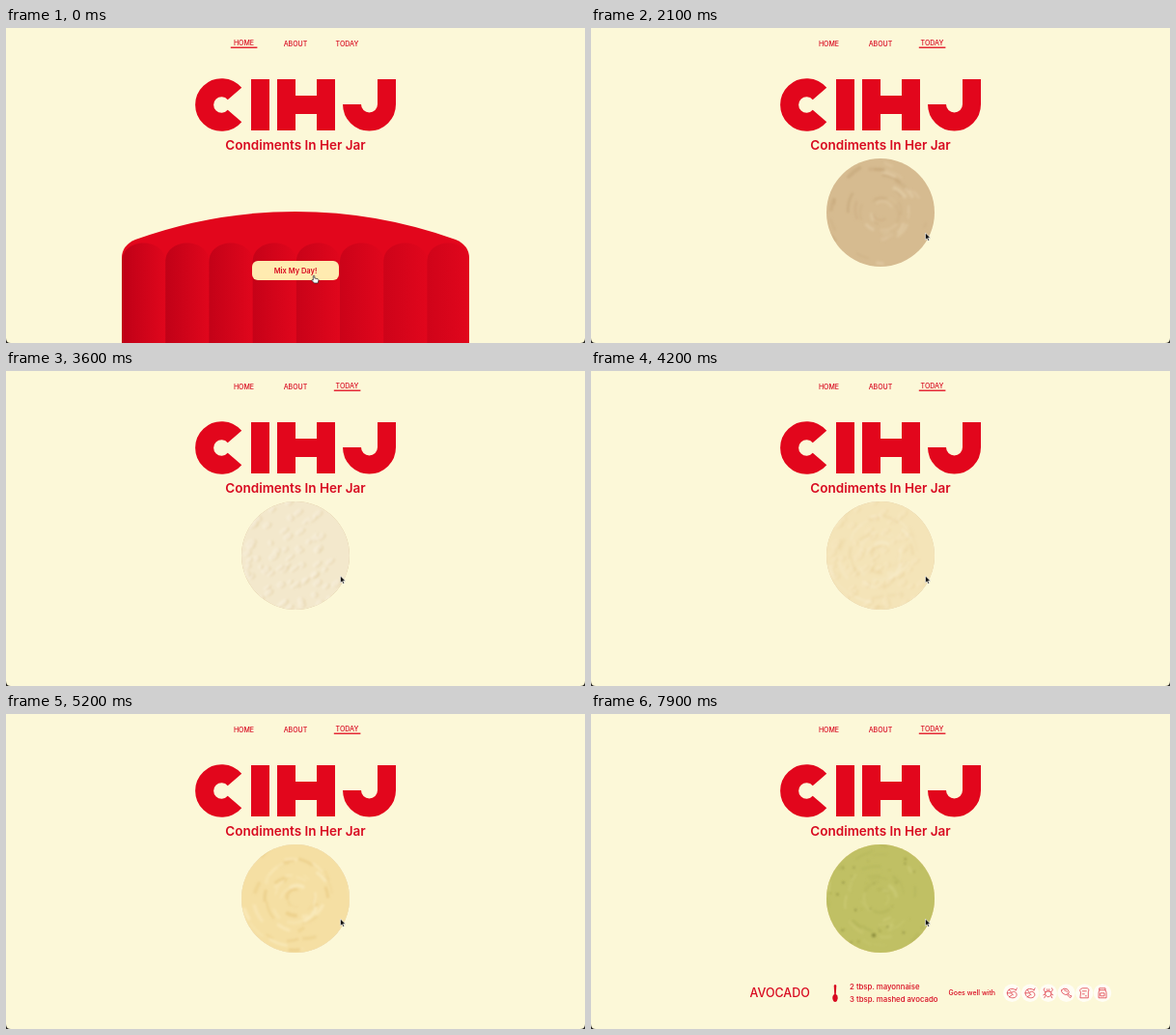
Animation, 600 px wide and 326 px high, one loop 8000 ms. Source, as an HTML page:

```html
<!DOCTYPE html>
<html lang="en">
<head>
<meta charset="utf-8">
<title>Condiments In Her Jar</title>
<style>
  html, body { margin: 0; width: 100%; height: 100%; overflow: hidden; background: #fcf8d8; }
  svg { display: block; width: 600px; height: 326px; }
  text { font-family: Inter, Lato, sans-serif; font-weight: 500; fill: #d80a20; }
  .mid { text-anchor: middle; }
  .line { fill: none; stroke: #e2061c; }
  .icon { fill: none; stroke: #dc3040; stroke-width: .75; stroke-linecap: round; stroke-linejoin: round; }
</style>
</head>
<body>
<svg viewBox="0 0 600 326">
  <defs>
    <linearGradient id="shade">
      <stop offset="0" stop-color="#b80016"/>
      <stop offset="1" stop-color="#df061c"/>
    </linearGradient>
    <clipPath id="dish"><circle cx="300" cy="191" r="56"/></clipPath>
    <filter id="soft" x="-20%" y="-20%" width="140%" height="140%"><feGaussianBlur stdDeviation=".9"/></filter>
  </defs>
  <rect width="600" height="326" fill="#fcf8d8"/>

  <g id="nav" font-size="7"></g>
  <g class="line" stroke-width="19" role="img" aria-label="CIHJ">
    <path d="M237 68A17.8 17.8 0 1 0 237 91M263.5 53V106M290.5 53V106M331.5 53V106M290 79.5H332M394.5 53V79A18 18 0 0 1 358.5 79"/>
  </g>
  <text class="mid" x="300" y="125.5" font-size="13.5" style="font-weight:600">Condiments In Her Jar</text>

  <g id="lid">
    <path fill="#e2061c" d="M120 326V238Q120 225 134 219A489 489 0 0 1 466 219Q480 225 480 238V326Z"/>
    <g id="ribs"></g>
    <rect id="button" x="255" y="241" width="90" height="20" rx="6" fill="#ffebb0"/>
    <text class="mid" x="300" y="253.7" font-size="7.5" style="font-weight:600">Mix My Day!</text>
  </g>

  <g id="sauces" clip-path="url(#dish)"></g>

  <g id="info">
    <text x="164.5" y="292.5" font-size="12.5">AVOCADO</text>
    <path fill="#d80a20" d="M251.7 281Q253 279 254.3 281L253.8 290Q256 291 255.7 294.5Q255 298 253 298Q251 298 250.3 294.5Q250 291 252.2 290Z"/>
    <text x="268" y="285" font-size="7.8">2 tbsp. mayonnaise</text>
    <text x="268" y="298" font-size="7.8">3 tbsp. mashed avocado</text>
    <text x="370.5" y="291.3" font-size="7">Goes well with</text>
    <g id="icons"></g>
  </g>

  <g id="pointer">
    <path id="arrow" fill="#111" stroke="#fff" stroke-width=".6" d="M0 0V7.2L1.7 5.7L2.9 8.3L4.1 7.8L3 5.2H5.2Z"/>
    <path id="hand" fill="#fff" stroke="#222" stroke-width=".7" stroke-linejoin="round"
      d="M-.7 4V.6Q0-.5 .8 .6V3L4.2 3.7Q5 4 4.8 5.5L4.2 8H.4L-2.2 5.2Q-2.2 4-.7 5Z"/>
  </g>
  <path fill="#2b2925" d="M0 321Q0 326 5 326H0ZM600 321Q600 326 595 326H600Z"/>
</svg>
<script>
const $ = id => document.getElementById(id);
const clamp = v => Math.min(1, Math.max(0, v));
const ramp = (t, a, b) => clamp((t - a) / (b - a));
const ease = k => k * k * (3 - 2 * k);
const LOOP = 8000, STEP = 100;

let seed = 1;
const rand = (a = 0, b = 1) => {
  seed = seed * 16807 % 2147483647;
  return a + (b - a) * seed / 2147483647;
};

$('nav').innerHTML = [['HOME', 246.5], ['ABOUT', 300], ['TODAY', 353.5]].map(([label, x]) =>
  `<g><text class="mid" x="${x}" y="18.5">${label}</text>
   <path class="line" stroke-width="1.3" d="M${x - 13.7} 20.2h27.6"/></g>`).join('');

$('ribs').innerHTML = Array.from({ length: 8 }, (_, i) => {
  const x = 120 + i * 45.2, w = Math.min(45.2, 480 - x);
  return `<path fill="url(#shade)" opacity="${0.85 - i * 0.06}"
    d="M${x} 326V242C${x} 216 ${x + w} 216 ${x + w} 242V326Z"/>`;
}).join('');

// Curved streaks around the dish centre
function swirls(count, light, dark) {
  let out = '';
  for (let i = 0; i < count; i++) {
    const r = rand(8, 56), a = rand(0, 6.28), b = a + rand(5, 22) / r;
    const at = (q, k) => `${(300 + k * Math.cos(q)).toFixed(1)} ${(191 + k * Math.sin(q)).toFixed(1)}`;
    out += `<path d="M${at(a, r)}A${r} ${r} 0 0 1 ${at(b, r + rand(-3, 3))}" fill="none"
      stroke="${i % 2 ? light : dark}" stroke-width="${rand(1, 4)}" opacity="${rand(.2, .65)}"/>`;
  }
  return out;
}

// Small lumps, each lit from the upper left
function lumps(count, light, dark) {
  let out = '';
  for (let i = 0; i < count; i++) {
    const x = rand(244, 356), y = rand(135, 247), rx = rand(2, 6), ry = rand(1.5, 3.5);
    const dot = (d, c) => `<ellipse cx="${x + d}" cy="${y + d}" rx="${rx}" ry="${ry}" fill="${c}"
      opacity=".6" transform="rotate(-38 ${x} ${y})"/>`;
    out += dot(1.3, dark) + dot(0, light);
  }
  return out;
}

function specks(count, color) {
  let out = '';
  for (let i = 0; i < count; i++)
    out += `<circle cx="${rand(248, 352)}" cy="${rand(138, 244)}" r="${rand(.4, 1.4)}" fill="${color}" opacity=".6"/>`;
  return out + `<circle cx="293" cy="229" r="2.3" fill="${color}" opacity=".8"/>`;
}

const sauces = [
  { start: 1700, base: '#d6bb90', art: swirls(44, '#e4cfaa', '#c5a679') },
  { start: 3000, base: '#f3e8cc', art: lumps(85, '#faf4e2', '#e2cea1') },
  { start: 4000, base: '#f5dfa3', art: swirls(50, '#fcf0c9', '#e9ca82') },
  { start: 5200, base: '#c0c064', art: swirls(36, '#d0cf7c', '#b0b157') + specks(36, '#858638') }
];
$('sauces').innerHTML = sauces.map(s =>
  `<g><rect x="243" y="134" width="114" height="114" fill="${s.base}"/><g filter="url(#soft)">${s.art}</g></g>`).join('');

const shrimp = 'M4-3C0-6-5-4-5 0S0 6 3 4.5 5-1 2-1.5-1 2 1 2M-5 0L-1 0M-3-3.5L-1-1M-3 4L0 2M4-3L5-5';
const icons = [
  shrimp, shrimp,
  'M-4-5Q-6-3-3-1M4-5Q6-3 3-1M-3-1Q0-3 3-1Q4 3 0 4Q-4 3-3-1M-3 1L-5 2M3 1L5 2M-3 3L-4 5M3 3L4 5M-1-2V-4M1-2V-4',
  'M-5-3Q-3-6 1-4Q4-1 2 1Q-1 3-4 0Q-5-1-5-3M2 1L4 3Q6 2 5 4Q4 6 3 4L1 2M-2-3Q0-3 1-1',
  'M-4-1Q-6-4-2-5H3Q6-4 4-1V5H-4ZM-2-2H2M-2 1H0M1 3H2',
  'M-3-5H3V-3H-3ZM-3-3Q-4-2-4 0V5H4V0Q4-2 3-3M-2 0H2V3H-2Z'
];
$('icons').innerHTML = icons.map((d, i) =>
  `<g transform="translate(${436.3 + i * 18.75} 288.8)"><circle r="9.2" fill="#fffdf4"/><path class="icon" d="${d}"/></g>`).join('');

function draw(t) {
  const today = t >= 1000;
  [!today, false, today].forEach((on, i) => {
    const [label, line] = $('nav').children[i].children;
    label.setAttribute('y', on ? 18 : 18.5);
    line.setAttribute('opacity', +on);
  });

  const drop = ramp(t, 1000, 1400);
  $('lid').setAttribute('transform', `translate(0 ${140 * drop * drop})`);

  const move = ease(ramp(t, 500, 1300));
  const x = 319 + 27.5 * move, y = 256 - 44 * move, hover = y > 241;
  $('pointer').setAttribute('transform', `translate(${x} ${y})`);
  $('hand').setAttribute('opacity', +hover);
  $('arrow').setAttribute('opacity', +!hover);

  sauces.forEach((s, i) =>
    $('sauces').children[i].setAttribute('opacity', ramp(t, s.start, s.start + 400)));
  $('info').setAttribute('opacity', ramp(t, 6200, 7000));
}

function tick() {
  draw(Math.floor(performance.now() % LOOP / STEP) * STEP);
  requestAnimationFrame(tick);
}
tick();
</script>
</body>
</html>
```
